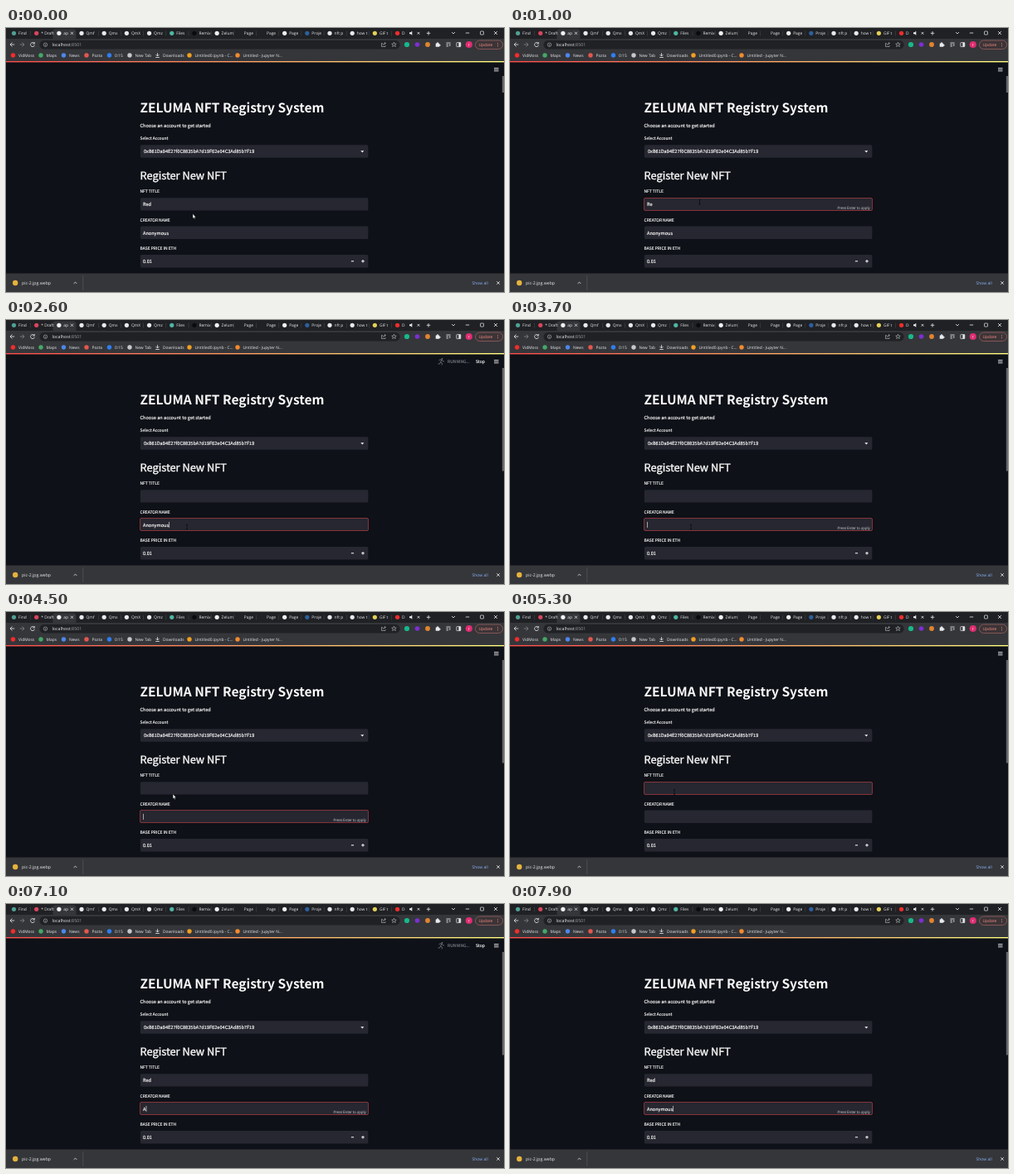
An HTML page with a canvas that plays this animation: 600 px wide and 319 px high, repeating every 8000 ms.

```html
<!DOCTYPE html>
<html lang="en">
<head>
<meta charset="utf-8">
<style>
html, body { margin: 0; width: 100%; height: 100%; overflow: hidden; background: #0e1117; }
canvas { display: block; width: 600px; height: 319px; }
</style>
</head>
<body>
<canvas id="stage"></canvas>
<script>
const stage = document.getElementById('stage');
const dpr = window.devicePixelRatio || 1;
stage.width = 600 * dpr;
stage.height = 319 * dpr;
const c = stage.getContext('2d');
c.scale(dpr, dpr);
c.textRendering = 'geometricPrecision';

const LOOP = 8000;
const UI = '"Open Sans", "Noto Sans", sans-serif';
const PAGE = '"Noto Sans CJK SC", "Noto Sans CJK JP", "Noto Sans CJK", "Open Sans", sans-serif';
const ACCOUNT = '0xB61Da94E27f0C8835bA7d19F62e04C3Ad85b7F19';

function text(s, x, y, size = 4.9, color = '#e8eaed', font = UI, weight = 400) {
  c.font = `${weight} ${size}px ${font}`;
  c.fillStyle = color;
  c.fillText(s, x, y);
}
// Regular page text gets a hairline outline for a medium weight
function pageText(s, x, y, size, weight = 400, color = '#fafafa') {
  text(s, x, y, size, color, PAGE, weight);
  if (weight > 400) return;
  c.strokeStyle = color;
  c.lineWidth = size * 0.03;
  c.strokeText(s, x, y);
}

function rect(x, y, w, h, color) {
  c.fillStyle = color;
  c.fillRect(x, y, w, h);
}
function box(x, y, w, h, r, fill, stroke, width = 0.7) {
  c.beginPath();
  c.roundRect(x, y, w, h, r);
  if (fill) { c.fillStyle = fill; c.fill(); }
  if (stroke) { c.strokeStyle = stroke; c.lineWidth = width; c.stroke(); }
}
function dot(x, y, r, color) {
  c.beginPath();
  c.arc(x, y, r, 0, 7);
  c.fillStyle = color;
  c.fill();
}
function path(d, x, y, stroke, fill, width = 0.8) {
  const p = new Path2D(d);
  c.save();
  c.translate(x, y);
  if (fill) { c.fillStyle = fill; c.fill(p); }
  if (stroke) { c.strokeStyle = stroke; c.lineWidth = width; c.stroke(p); }
  c.restore();
}
const cross = (x, y, r, color = '#e8eaed') => path(`M${-r} ${-r}L${r} ${r}M${r} ${-r}L${-r} ${r}`, x, y, color);

// Tabs: label and icon colour
const TABS = [
  ['Find', '#4f9f92'], ['* Draft', '#d9455f'], ['ap', '#f1f1f1'],
  ['Qmf', '#e8eaed'], ['Qmx', '#e8eaed'], ['QmX', '#e8eaed'], ['Qmz', '#e8eaed'],
  ['Files', '#4fb5a5'], ['Remix', '#0a0b0d'], ['Zelum', '#f1f1f1'],
  ['Page', ''], ['Page', ''], ['Page', '#f1f1f1'], ['Proje', '#2d5f9e'],
  ['nft p', '#e8eaed'], ['how t', '#e8eaed'], ['GIF t', '#e3cf57'], ['D', '#f22c2c']
];
// Bookmarks: label, icon x, icon colour
const BOOKMARKS = [
  ['VidMoss', 8.5, '#f22c2c'], ['Maps', 42, '#43a866'], ['News', 69.5, '#4d86e8'],
  ['Pozta', 97, '#e2574c'], ['0:15', 124.5, '#2f7ff0'], ['New Tab', 149, '#c4c7cc'],
  ['Downloads', 182.5, ''], ['Untitled0.ipynb - C...', 221, '#f0a020'],
  ['Untitled - Jupyter N...', 279, '#f28a2e']
];

function drawTabs() {
  rect(0, 0, 600, 14, '#202124');
  box(56.5, 1.5, 28, 14, 3, '#35363a');
  TABS.forEach(([label, color], i) => {
    const x = 9.5 + 27.18 * i;
    if (color) dot(x, 6.3, 2.6, color);
    text(label, x + 5.5, 8.1);
    if (i !== 1 && i !== 2 && i < 17) rect(x + 20, 3.5, 0.5, 6, '#4b4c50');
  });
  cross(79.5, 6.3, 1.6);
  path('M-2 -1H-.5L1.3 -2.5V2.5L-.5 1H-2Z', 488, 6.3, null, '#e8eaed');
  cross(497, 6.3, 1.4);
  path('M-2.3 0H2.3M0 -2.3V2.3', 509, 6.3, '#e8eaed');
  path('M-2 -1L0 1L2 -1', 539, 6, '#e8eaed');
  path('M-2.2 0H2.2', 556, 6, '#e8eaed');
  box(571.5, 4, 4, 4, 0.5, null, '#e8eaed');
  cross(590, 6, 2);
}

function drawToolbar() {
  rect(0, 13, 600, 27, '#35363a');
  path('M2.7 0H-2.5M0 -2.5L-2.5 0L0 2.5', 7.5, 20, '#e8eaed');
  path('M-2.7 0H2.5M0 -2.5L2.5 0L0 2.5', 19.5, 20, '#85878b');
  path('M2 -1.5A2.5 2.5 0 1 0 2.5 .6M2.3 -3V-1H.3', 32, 20, '#e8eaed');
  box(40.5, 15, 434, 10.5, 5.2, '#202124');
  c.beginPath();
  c.arc(47.5, 20.2, 2.2, 0, 7);
  c.strokeStyle = '#bdc1c6';
  c.lineWidth = 0.6;
  c.stroke();
  rect(47.2, 19.6, 0.6, 1.8, '#bdc1c6');
  text('localhost', 55.5, 22.1, 5.3);
  text(':8501', 55.5 + c.measureText('localhost').width, 22.1, 5.3, '#9aa0a6');
  path('M-1 -1.5H-2.5V2.5H2V1M-1 1Q-.5 -1.5 2.3 -1.5M1 -3L2.5 -1.5L1 0', 455, 20, '#bdc1c6', null, 0.6);
  path('M0 -2.8L.8 -.9L2.8 -.8L1.2 .5L1.8 2.5L0 1.4L-1.8 2.5L-1.2 .5L-2.8 -.8L-.8 -.9Z', 467.5, 20, '#bdc1c6', null, 0.6);
  dot(483, 20, 3.1, '#16b88a');
  dot(495.5, 20, 2.8, '#7b2fd0');
  dot(508, 20, 2.9, '#e2832f');
  path('M-2.3 -1.5H-.8A.9 .9 0 1 1 .9 -1.5H2.2V0A.9 .9 0 1 1 2.2 1.6V2.8H-2.3Z', 520, 20, null, '#e8eaed');
  path('M-2.6 -2H2.6M-2.6 0H0M-2.6 2H0M1.8 -1V2', 533, 20, '#e8eaed');
  box(542.8, 17.6, 5, 5, 0.5, null, '#e8eaed');
  rect(545.4, 17.6, 2.4, 5, '#e8eaed');
  dot(557.8, 20, 4.1, '#df2d72');
  text('r', 556.8, 21.8, 5, '#fff');
  box(565.5, 15, 33, 10.5, 5.2, '#3b3437', '#b96d69', 0.6);
  text('Update', 569.5, 21.9, 4.9, '#f28b82');
  for (let i = -1; i < 2; i++) dot(592.5, 20.2 + i * 1.7, 0.5, '#f28b82');
}

function drawBookmarks() {
  for (const [label, x, color] of BOOKMARKS) {
    if (color) dot(x, 33, 2.7, color);
    else path('M0 -2.8V1M-2 -1L0 1L2 -1M-2.3 2.5H2.3', x, 33, '#e8eaed');
    text(label, x + 6.5, 34.9);
  }
}

function drawDownloads() {
  rect(0, 296.5, 600, 23, '#35363a');
  dot(11.2, 308, 3.2, '#e5b33c');
  text('pic-2.jpg.webp', 19, 309.9, 5.2);
  path('M-1.8 .9L0 -.9L1.8 .9', 83.5, 308, '#e8eaed');
  rect(92.5, 299, 0.7, 18, '#55565a');
  text('Show all', 561.5, 309.9, 5, '#8ab4f8');
  cross(593, 308, 1.8);
}

function drawField(y, value, focused, dirty, caretOn) {
  box(161.8, y, 274.6, 15.3, 1.5, '#262730');
  if (focused) box(161.5, Math.floor(y) + 0.5, 275, 15, 1.5, null, '#94353f', 0.9);
  pageText(value, 165, y + 9.9, 5.6);
  if (focused && caretOn) rect(165.3 + c.measureText(value).width, y + 4.3, 0.6, 7, '#fafafa');
  if (dirty) pageText('Press Enter to apply', 394.5, y + 13.4, 4.25, 400, '#a0a1a6');
}

function drawStatus() {
  dot(525.5, 46.8, 0.9, '#777982');
  path('M.5 -2L-1 1L1.2 2.3L.5 4.5M-1 1L-2 3H-4M-3 -1L-1.5 -2.2L.5 -2L2 0H3.5', 524.5, 50, '#777982', null, 0.8);
  pageText('RUNNING...', 532, 52, 5, 400, '#777982');
  pageText('Stop', 566, 52, 5);
}

// Piecewise eased pointer route: time, x, y
const ROUTE = [[0, 225, 227], [100, 225, 227], [400, 228.5, 210.5], [1900, 228.5, 210.5],
  [2200, 218, 250], [4200, 218, 250], [4600, 198, 217.5], [6500, 198, 217.5], [6800, 203, 249], [8000, 203, 249]];

function drawPointer(t) {
  if (between(t, 5700, 6550) || t >= 7100) return;
  const i = ROUTE.findIndex(p => p[0] > t);
  const [t0, x0, y0] = ROUTE[i - 1], [t1, x1, y1] = ROUTE[i];
  const u = (t - t0) / (t1 - t0), e = u * u * (3 - 2 * u);
  const x = x0 + (x1 - x0) * e, y = y0 + (y1 - y0) * e;
  const overField = [205, 239.5].some(top => y >= top && y <= top + 15.3);
  if (overField) path('M-1 -2.8H1M0 -2.8V2.8M-1 2.8H1', x, y, '#08090c', null, 0.7);
  else path('M0 -2.5V3L1.2 2L2 3.8L2.9 3.4L2.1 1.7H3.8Z', x, y, '#111', '#fff', 0.4);
}

const clamp = (n, max) => Math.max(0, Math.min(max, Math.floor(n)));
const between = (t, a, b) => t >= a && t < b;

function formAt(t) {
  const titleLength = t < 4600 ? 3 - clamp((t - 700) / 200, 3) : clamp((t - 5500) / 200, 3);
  const nameLength = t < 4600 ? 9 - clamp((t - 2830) / 80, 9) : clamp((t - 7020) / 80, 9);
  return {
    title: 'Red'.slice(0, titleLength),
    name: 'Anonymous'.slice(0, nameLength),
    onTitle: between(t, 400, 2200) || between(t, 4600, 6800),
    onName: between(t, 2200, 4600) || t >= 6800,
    titleDirty: between(t, 900, 2200) || between(t, 5700, 6800),
    nameDirty: between(t, 2910, 4600) || t >= 7100,
    running: between(t, 2300, 2800) || between(t, 4700, 5100) || between(t, 6900, 7200)
  };
}

function drawPage(t) {
  const f = formAt(t);
  rect(0, 40, 600, 257, '#0e1117');
  const line = c.createLinearGradient(0, 0, 600, 0);
  line.addColorStop(0, '#ff4b4b');
  line.addColorStop(1, '#fffd80');
  rect(0, 40, 600, 1.4, line);
  for (let i = -1; i < 2; i++) rect(588, 49.8 + i * 1.8, 5.5, 0.8, '#e6e7e9');
  rect(597.8, 58, 2.2, t < 2200 ? 20 : 124.5, '#66676c');
  if (f.running) drawStatus();

  pageText('ZELUMA NFT Registry System', 161.5, 102.3, 15.5, 700);
  pageText('Choose an account to get started', 161.5, 119.7, 5.6);
  pageText('Select Account', 161.5, 135.3, 4.95);
  box(161.8, 141.3, 274.6, 15.5, 1.5, '#262730');
  pageText(ACCOUNT, 166, 151.3, 5.6);
  path('M-2 -1H2L0 1.2Z', 429.3, 149.3, null, '#fafafa');
  pageText('Register New NFT', 161.5, 183, 12.8);

  const blink = !between(t % 1000, 250, 480) && !between(t, 900, 1400) && !between(t, 5200, 5500);
  pageText('NFT TITLE', 161.5, 199.3, 4.95);
  drawField(205.2, f.title, f.onTitle, f.titleDirty, blink && !between(t, 6300, 6800));
  pageText('CREATOR NAME', 161.5, 233.7, 4.95);
  drawField(239.6, f.name, f.onName, f.nameDirty, blink);
  pageText('BASE PRICE IN ETH', 161.5, 268.2, 4.95);
  drawField(274.1, '0.01');
  path('M-1.6 0H1.6', 417.5, 281.8, '#fafafa', null, 1);
  path('M-1.8 0H1.8M0 -1.8V1.8', 430, 281.8, '#fafafa', null, 1);
  drawPointer(t);
}

function frame(now) {
  const t = Math.floor(now % LOOP / 100) * 100;
  drawPage(t);
  drawTabs();
  drawToolbar();
  drawBookmarks();
  drawDownloads();
  requestAnimationFrame(frame);
}
requestAnimationFrame(frame);
</script>
</body>
</html>
```
